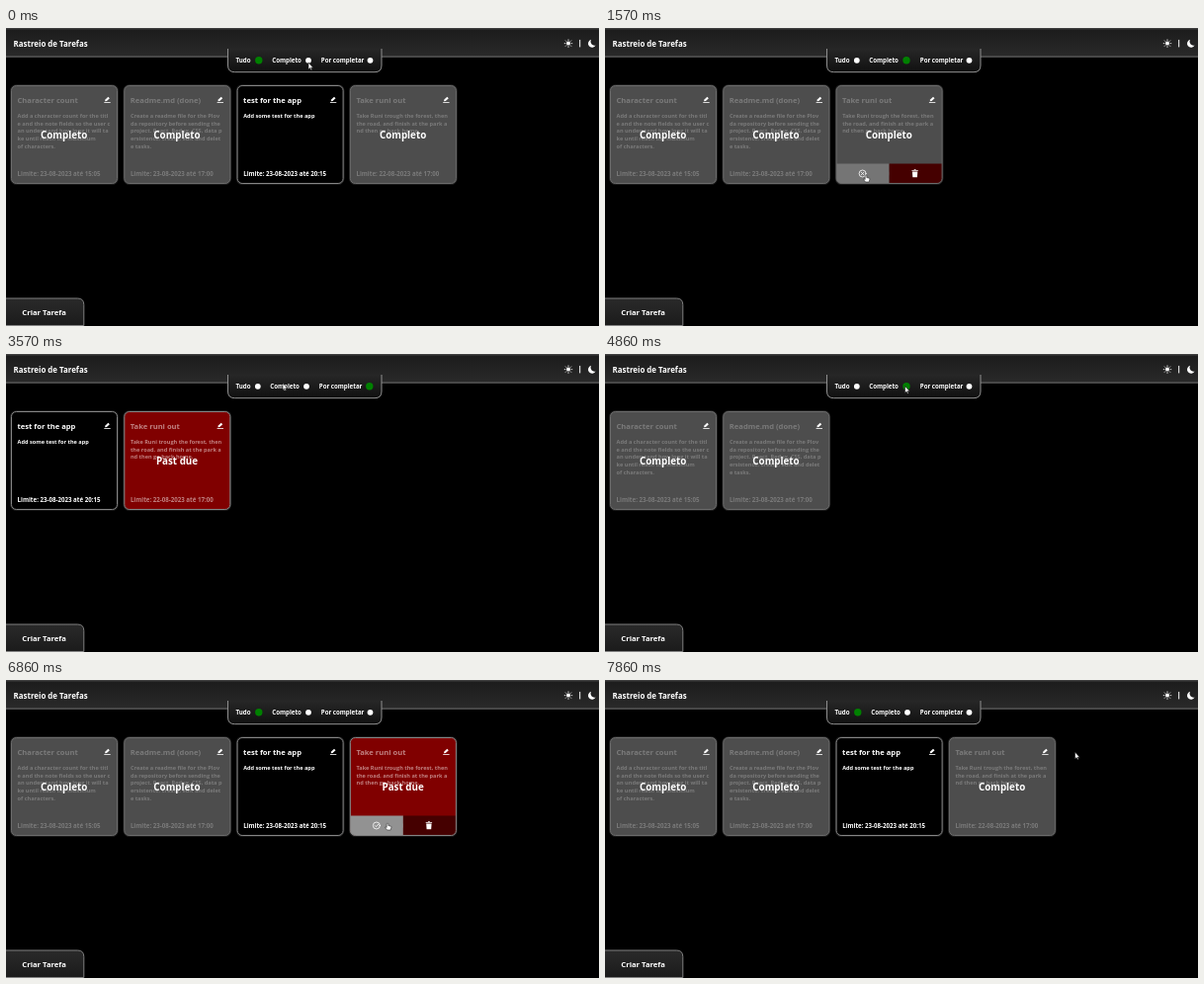
These frames come from a looping animation (600 by 302 pixels, 8 s). An HTML page:

```html
<!DOCTYPE html>
<html lang="pt">
<head>
<meta charset="utf-8">
<title>Rastreio de Tarefas</title>
<style>
html, body { margin: 0; width: 100%; height: 100%; overflow: hidden; background: #000; }
svg { display: block; width: 100%; height: 100%; }
text { font: 700 6.15px "Open Sans", sans-serif; fill: #fff; white-space: pre; }
.heading { font-size: 7.9px; }
.create { font-size: 7.67px; }
.name { font-size: 7.6px; }
.note { font-size: 5.6px; }
.stamp { font-size: 9.82px; text-anchor: middle; }
.line { fill: none; stroke: #fff; stroke-linecap: round; stroke-linejoin: round; }
</style>
</head>
<body>
<svg viewBox="0 0 600 302" preserveAspectRatio="none">
  <defs>
    <linearGradient id="bar" x2="0" y2="1"><stop stop-color="#1b1b1b"/><stop offset="1" stop-color="#2a2a2a"/></linearGradient>
    <linearGradient id="panel" x2="0" y2="1"><stop stop-color="#272727"/><stop offset="1" stop-color="#101010"/></linearGradient>
    <linearGradient id="button" x2="0" y2="1"><stop stop-color="#2a2a2a"/><stop offset="1" stop-color="#1b1b1b"/></linearGradient>
    <clipPath id="inside"><rect x=".5" y=".5" width="107" height="99" rx="5"/></clipPath>
    <g id="pencil">
      <path class="line" stroke-width=".8" d="M-2.8 3H2.8"/>
      <path fill="#fff" d="M-2.4 1.8L-2 .1L.9-2.8L2.4-1.3L-.6 1.5Z"/>
    </g>
    <g id="trash" fill="#fff">
      <path d="M-3.2-3.4H-1.2L-.7-4H.7L1.2-3.4H3.2V-2.5H-3.2ZM-2.7-1.9H2.7L2.3 4H-2.3Z"/>
    </g>
    <path id="arrow" fill="#fff" stroke="#111" stroke-width=".6" d="M0 0V7L1.6 5.6L2.6 7.8L3.7 7.3L2.7 5.2H4.8Z"/>
    <path id="hand" fill="#fff" stroke="#111" stroke-width=".5" d="M-.8 .6Q0-.5 .8 .6V2.6L3.4 3.2Q4 3.5 3.8 4.5L3.2 7H-.4L-2.6 4.4Q-2.4 3.4-.8 4.5Z"/>
  </defs>

  <rect width="600" height="302"/>
  <rect width="600" height="29" fill="url(#bar)"/>
  <rect width="600" height="1.5" fill="#3c3c3c"/>
  <rect y="28.6" width="600" height="1" fill="#777"/>
  <text class="heading" x="7.6" y="18.5">Rastreio de Tarefas</text>
  <g transform="translate(569 15.6)">
    <circle r="2" fill="#fff"/>
    <g id="rays" class="line" stroke-width=".8"></g>
  </g>
  <path class="line" stroke-width="1" d="M580.7 12.3V19"/>
  <path fill="#fff" d="M592 11.8A4 4 0 1 0 596.6 17.4A3.9 3.9 0 0 1 592 11.8Z"/>

  <path fill="url(#panel)" d="M224.5 21H380V38Q380 45 373 45H231.500Q224.500 45 224.500 38Z"/>
  <path fill="none" stroke="#909090" d="M224.500 21V38Q224.500 44.700 231.500 44.700H373Q380 44.700 380 38V21"/>
  <g id="filters"></g>

  <path fill="url(#button)" stroke="#808080" d="M-1 274H72.500Q78.800 274 78.800 280.500V301.500H-1Z"/>
  <text class="create" x="16.3" y="290.800">Criar Tarefa</text>

  <g id="cards"></g>
  <use id="cursor"/>
</svg>
<script>
const LOOP = 8000, TICK = LOOP / 56;
const $ = id => document.getElementById(id);

const CARD = { x: 5, y: 58, width: 108, height: 100, pitch: 114.3, barTop: 79.5 };

const tasks = [
  { name: 'Character count', done: true, limit: '23-08-2023 até 15:05', note: [
    'Add a character count for the titl', 'e and the note fields so the user c',
    'an understand how long it will ta', 'ke until reach the maximum', 'of characters.'] },
  { name: 'Readme.md (done)', done: true, limit: '23-08-2023 até 17:00', note: [
    'Create a readme file for the Plov', 'da repository before sending the',
    'project. React, Redux, CSS, data p', 'ersistence, create, edit and delet', 'e tasks.'] },
  { name: 'test for the app', limit: '23-08-2023 até 20:15', note: ['Add some test for the app'] },
  { name: 'Take runi out', late: true, limit: '22-08-2023 até 17:00', note: [
    'Take Runi trough the forest, then', 'the road, and finish at the park a', 'nd then go back home.'] }
];

// Times below are in ticks.
const clicks = [[0, 'all'], [2, 'done'], [21, 'todo'], [33, 'done'], [42, 'all']];
const reopened = [13, 49];
const path = [
  [0, 306, 35], [2, 306, 35], [8, 264, 149], [13, 264, 149], [16, 344, 34], [17, 367, 32],
  [24, 367, 32], [25, 280, 29.500], [28, 290, 17], [32, 303.500, 32.500], [36, 303.500, 32.500],
  [40, 258, 32.500], [43, 255, 32.500], [46, 386, 145], [50, 386, 145], [53, 471, 8], [55, 475.500, 73]
];

function cursorAt(tick) {
  const i = path.findIndex(p => p[0] >= tick);
  if (i < 1) return path[0].slice(1);
  const [a, b] = [path[i - 1], path[i]];
  const u = (tick - a[0]) / (b[0] - a[0]);
  const ease = u * u * (3 - 2 * u);
  return [1, 2].map(k => a[k] + (b[k] - a[k]) * ease);
}

const text = (cls, x, y, words) => `<text class="${cls}" x="${x}" y="${y}">${words}</text>`;

function drawFilters(active) {
  const left = { all: [232.500, 269.300, 318.800], done: [232.500, 267.300, 318.800], todo: [232.500, 267.300, 316.800] }[active];
  const dots = { all: [255.800, 306, 368.500], done: [254.800, 305, 368.500], todo: [254.800, 304, 367.800] }[active];
  const labels = [['all', 'Tudo'], ['done', 'Completo'], ['todo', 'Por completar']];
  return labels.map(([key, label], i) => {
    const on = key === active;
    return text('', left[i], 35, label) +
      `<circle cx="${dots[i]}" cy="32.800" r="${on ? 3.700 : 2.900}" fill="${on ? '#008000' : '#fff'}"/>`;
  }).join('');
}

function drawActions(done) {
  const mark = done ? 'M-1.300-1.300L1.300 1.300M1.300-1.300L-1.300 1.300' : 'M-1.600 0L-.400 1.200L1.700-1.200';
  return `<g clip-path="url(#inside)">
    <rect y="${CARD.barTop}" width="54" height="21" fill="${done ? '#757575' : '#929292'}"/>
    <rect x="54" y="${CARD.barTop}" width="54" height="21" fill="#450000"/></g>
    <g class="line" stroke-width=".8" transform="translate(27 89.500)"><circle r="3.500"/><path d="${mark}"/></g>
    <use href="#trash" x="80" y="89.300"/>`;
}

function drawCard(task, slot, hovered) {
  const stamp = task.done ? 'Completo' : task.late ? 'Past due' : '';
  const fill = task.done ? '#4d4d4d' : task.late ? '#800000' : '#000';
  const fade = task.done ? .25 : task.late ? .5 : 1;
  const box = 'x=".500" y=".500" width="107" height="99" rx="5"';
  return `<g transform="translate(${CARD.x + slot * CARD.pitch} ${CARD.y})">
    <rect ${box} fill="none" stroke="#fff" stroke-opacity=".15" stroke-width="2.600"/>
    <rect ${box} fill="${fill}"/>
    <g opacity="${fade}">
      ${text('name', 6.500, 17.600, task.name)}
      ${task.note.map((line, i) => text('note', 6.600, 32.700 + i * 7.800, line)).join('')}
      ${text('', 6.600, 91.900, 'Limite: ' + task.limit)}
    </g>
    ${text('stamp', 53.700, 53.700, stamp)}
    <use href="#pencil" x="97.500" y="14.500"/>
    ${hovered ? drawActions(task.done) : ''}
    <rect ${box} fill="none" stroke="${task.done ? '#6c6c6c' : '#858585'}"/>
  </g>`;
}

let shown = -1;
function draw(now) {
  const tick = Math.floor(((now + 3) % LOOP) / TICK);
  if (tick !== shown) {
    shown = tick;
    const filter = clicks.filter(c => c[0] <= tick).pop()[1];
    tasks[3].done = tick < reopened[0] || tick >= reopened[1];
    const list = tasks.filter(t => filter === 'all' || !!t.done === (filter === 'done'));

    const [x, y] = cursorAt(tick);
    const across = x - CARD.x, down = y - CARD.y;
    const inRow = down >= 0 && down <= CARD.height && across % CARD.pitch < CARD.width;
    const hover = inRow ? Math.floor(across / CARD.pitch) : -1;

    $('filters').innerHTML = drawFilters(filter);
    $('cards').innerHTML = list.map((t, i) => drawCard(t, i, i === hover)).join('');
    const onButton = hover >= 0 && hover < list.length && down > CARD.barTop;
    $('cursor').setAttribute('href', onButton ? '#hand' : '#arrow');
    $('cursor').setAttribute('transform', `translate(${x} ${y})`);
  }
}

$('rays').innerHTML = Array.from({ length: 8 }, (_, i) =>
  `<path d="M0-3.100V-3.800" transform="rotate(${i * 45})"/>`).join('');

const start = performance.now();
function loop() {
  draw(performance.now() - start);
  requestAnimationFrame(loop);
}
loop();
</script>
</body>
</html>
```
